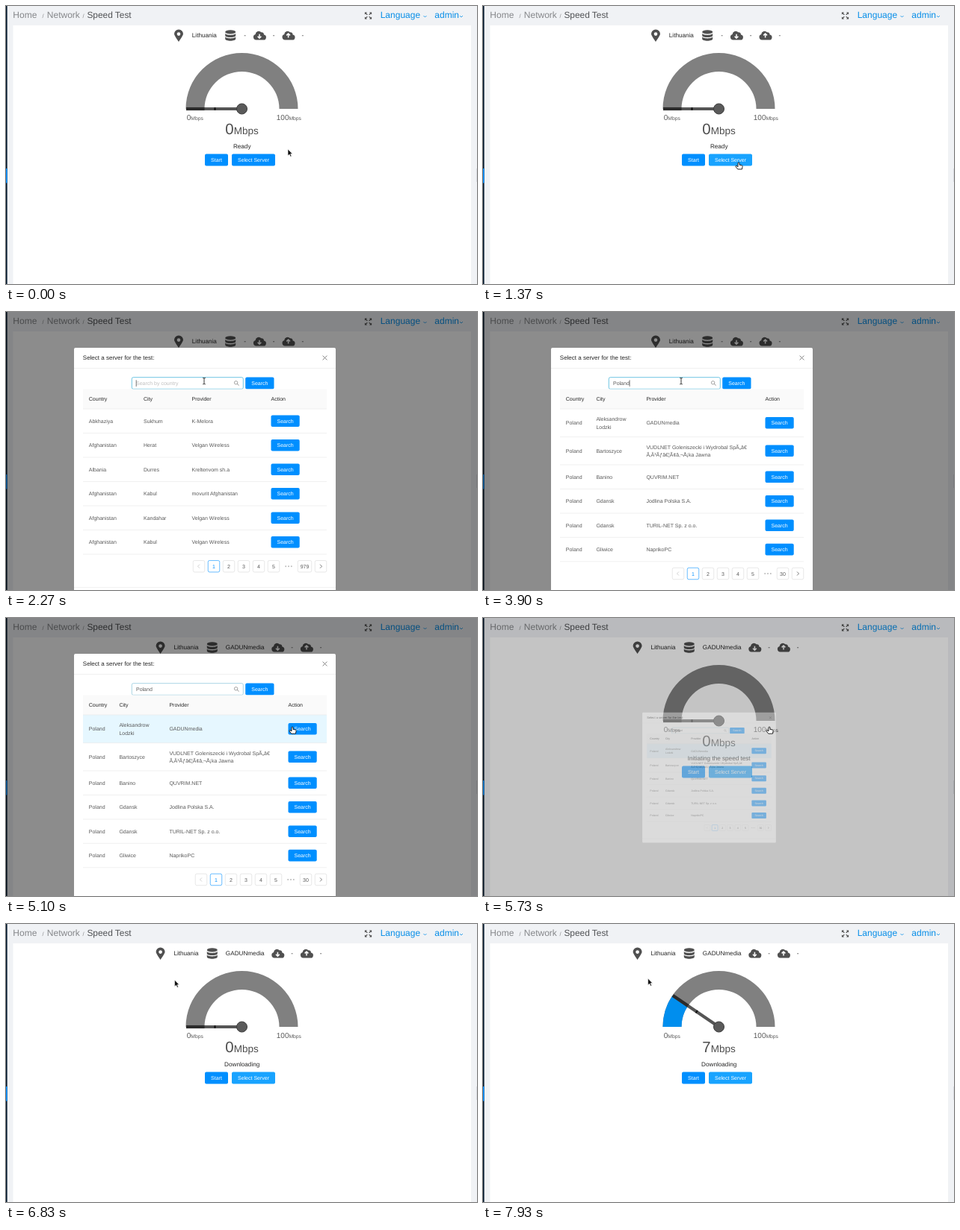
Write an HTML page that moves like this. It is 630x373 px and loops after 8 s.

```html
<!DOCTYPE html>
<html lang="en">
<head>
<meta charset="utf-8">
<title>Speed test</title>
<style>
  html, body { margin: 0; width: 100%; height: 100%; overflow: hidden; background: #f0f2f5; }
  svg { display: block; width: 630px; height: 373px; }
  text { font-family: "Liberation Sans", Arial, sans-serif; text-rendering: geometricPrecision; white-space: pre; }
</style>
</head>
<body>
<svg id="stage" viewBox="0 0 630 373" xmlns="http://www.w3.org/2000/svg"></svg>
<script>
const LOOP = 8000;
const BLUE = '#008fff', LIGHT = '#18a3ff', LINK = '#078ee8';
const GREY = '#595959', DARK = '#262626', ICON = '#505050';
const HUB = { x: 315.5, y: 138 };
const ORIGIN = { x: 340.5, y: 209 };

// Markup helpers
const text = (x, y, s, size = 7, fill = GREY, anchor = 'start', id = '') =>
  `<text x="${x}" y="${y}" font-size="${size}" fill="${fill}" text-anchor="${anchor}"${id && ` id="${id}"`}>${s}</text>`;
const rect = (x, y, w, h, fill, extra = '') =>
  `<rect x="${x}" y="${y}" width="${w}" height="${h}" fill="${fill}" ${extra}/>`;
const line = (d, color, width = 1, extra = '') =>
  `<path d="${d}" fill="none" stroke="${color}" stroke-width="${width}" ${extra}/>`;
const button = (x, y, w, h, label, id = '') =>
  rect(x, y, w, h, BLUE, `rx="2"${id && ` id="${id}"`}`) +
  text(x + w / 2, y + h / 2 + 2.4, label, 7, '#fff', 'middle');
const at = (x, y, inner, extra = '') => `<g transform="translate(${x} ${y})" ${extra}>${inner}</g>`;

// Icons, each drawn around its own centre
const pin = `<path d="M0 8.3C-2.5 4.5-6-.5-6-2.2a6 6 0 0 1 12 0C6-.5 2.5 4.5 0 8.3z" fill="${ICON}"/>
  <circle cy="-2.2" r="2.3" fill="#fff"/>`;
const disc = y => `<path d="M-7 ${y}c0 3.2 14 3.2 14 0v2.9c0 3.6-14 3.6-14 0z" fill="${ICON}"/>`;
const database = `<ellipse cy="-5.3" rx="7" ry="2.7" fill="${ICON}"/>` + disc(-3.7) + disc(0.9);
const cloud = dir => `<path d="M-4.5 6a3.9 3.9 0 0 1-.9-7.6 4.5 4.5 0 0 1 7.8-2.7 3.4 3.4 0 0 1 3.6 3.2A3.6 3.6 0 0 1 4.6 6z" fill="${ICON}"/>` +
  line('M0-2.4V2.6M-2.4 .7L0 3.1 2.4 .7', '#fff', 1.5, `transform="translate(0 .6) scale(1 ${dir})"`);
const corner = `<path d="M4.6-4.6V-1.4L1.4-4.6z" fill="${ICON}"/>` + line('M1.2-1.2L4-4', ICON, 1.2);
const expand = [0, 90, 180, 270].map(a => `<g transform="rotate(${a})">${corner}</g>`).join('');
const chevron = line('M-2-1L0 1 2-1', LINK, 0.8);

// Gauge geometry: angle in degrees, 0 points left, 180 points right
const polar = (r, a) => {
  const k = a * Math.PI / 180;
  return `${(HUB.x - r * Math.cos(k)).toFixed(2)} ${(HUB.y - r * Math.sin(k)).toFixed(2)}`;
};
const sector = a => `M${polar(75, 0)}A75 75 0 0 1 ${polar(75, a)}L${polar(50, a)}A50 50 0 0 0 ${polar(50, 0)}z`;

const needle = `<g id="needle">` +
  line('M0 0H-74.5', '#555', 4.2) + line('M-50 0H-74.5', '#2b2b2b', 4.2) +
  line('M-36-2V2', '#111', 2) + '</g>';

const header =
  rect(0, 0, 630, 373, '#f0f2f5') + rect(9.5, 26, 612.5, 347, '#fff') +
  rect(0, 0, 1.6, 373, '#001529') + rect(0, 218, 1.6, 19.5, BLUE) + rect(629.3, 218, 0.7, 18, '#cfd2d8') +
  text(9.3, 16.3, 'Home', 12, '#85878a') + text(48.6, 16.3, '/', 7.5, '#85878a') +
  text(54.8, 16.3, 'Network', 12, '#85878a') + text(102.6, 16.3, '/', 7.5, '#85878a') +
  text(108.4, 16.3, 'Speed Test', 11.9, '#515356') +
  at(484.5, 13, expand) +
  text(500.7, 16.3, 'Language', 12, LINK) + at(560.5, 14, chevron) +
  text(573.3, 16.3, 'admin', 12, LINK) + at(609, 14, chevron);

const info =
  `<g id="infoLeft">${at(231, 39.8, pin)}${text(248.8, 41.6, 'Lithuania', 8.17, DARK)}${at(300.2, 40.2, database)}</g>` +
  text(319.7, 41.6, '-', 8.17, DARK, 'middle', 'server') +
  `<g id="infoRight">${at(339, 39.5, cloud(1))}${text(358.2, 41.6, '-', 8.17, DARK, 'middle')}` +
  `${at(377.6, 39.5, cloud(-1))}${text(396.8, 41.6, '-', 8.17, DARK, 'middle')}</g>`;

const unit = size => `<tspan font-size="${size}">Mbps</tspan>`;
const gauge =
  `<path d="${sector(180)}" fill="#808080"/><path id="fill" fill="#008eee"/>` + needle +
  `<circle cx="${HUB.x}" cy="${HUB.y}" r="7" fill="#5a5a5a" stroke="#3d3d3d"/>` +
  text(241.8, 153.4, '0' + unit(6.75), 10) + text(361.8, 153.4, '100' + unit(6.75), 10) +
  text(315.5, 172, '<tspan id="speed">0</tspan>' + unit(13.5), 20.4, '#4d4d4d', 'middle') +
  text(315.7, 191.2, 'Ready', 8.17, DARK, 'middle', 'status') +
  button(266, 198.5, 31, 16, 'Start') + button(302, 198.5, 58, 16, 'Select Server', 'select');

// Tables: column positions, row edges and cells ("|" breaks a line)
const HEADS = ['Country', 'City', 'Provider', 'Action'];
const tables = [
  {
    cols: [110.8, 184, 248.5, 354.5], last: '979', lastWidth: 19,
    edges: [130, 162.5, 195, 227.5, 260, 292.4, 325],
    rows: [
      ['Abkhaziya', 'Sukhum', 'K-Melora'],
      ['Afghanistan', 'Herat', 'Velgan Wireless'],
      ['Albania', 'Durres', 'Kreltenvom sh.a'],
      ['Afghanistan', 'Kabul', 'movurit Afghanistan'],
      ['Afghanistan', 'Kandahar', 'Velgan Wireless'],
      ['Afghanistan', 'Kabul', 'Velgan Wireless']
    ]
  },
  {
    cols: [110.8, 151.4, 218.4, 377.5], last: '30', lastWidth: 16,
    edges: [130, 167.6, 205, 237.5, 270, 302.4, 334.8],
    rows: [
      ['Poland', 'Aleksandrow|Lodzki', 'GADUNmedia'],
      ['Poland', 'Bartoszyce', 'VUDLNET Goleniszecki i Wydrobal SpÃ„â€|Ã‚Â³Ãƒâ€¦Ã¢â‚¬Å¡ka Jawna'],
      ['Poland', 'Banino', 'QUVRIM.NET'],
      ['Poland', 'Gdansk', 'Jodlina Polska S.A.'],
      ['Poland', 'Gdansk', 'TURIL-NET Sp. z o.o.'],
      ['Poland', 'Gliwice', 'NaprikoPC']
    ]
  }
];

function cell(x, mid, s) {
  const parts = s.split('|');
  return parts.map((p, i) => text(x, mid + 2.5 + (i - (parts.length - 1) / 2) * 10.5, p)).join('');
}

function pager(y, last, lastWidth) {
  const box = (x, w, label, color = GREY, edge = '#d9d9d9') =>
    rect(x + 0.25, y - 7.75, w - 0.5, 15.5, '#fff', `rx="2" stroke="${edge}" stroke-width=".6"`) +
    text(x + w / 2, y + 2.5, label, 7, color, 'middle');
  const dots = 409 - lastWidth - 20;
  let s = box(413, 16, '') + line(`M420 ${y - 2.5}l2.5 2.5-2.5 2.5`, GREY, 0.8) + box(409 - lastWidth, lastWidth, last);
  for (let i = 0; i < 3; i++) s += `<circle cx="${dots + 4.2 + i * 3.8}" cy="${y}" r="1" fill="#bbb"/>`;
  for (let n = 1; n <= 5; n++)
    s += box(dots - (6 - n) * 20, 16, n, n === 1 ? BLUE : GREY, n === 1 ? BLUE : '#d9d9d9');
  return s + box(dots - 120, 16, '') + line(`M${dots - 111} ${y - 2.5}l-2.5 2.5 2.5 2.5`, '#c4c4c4', 0.8);
}

function tableMarkup({ cols, edges, rows, last, lastWidth }, i) {
  let s = rect(103, 103.5, 326, 26.5, '#fafafa');
  HEADS.forEach((h, c) => s += text(cols[c], 119, h, 7, DARK));
  edges.forEach(y => s += line(`M103 ${y}H429`, '#e6e6e6', 0.6));
  rows.forEach((row, r) => {
    const mid = (edges[r] + edges[r + 1]) / 2;
    row.forEach((s2, c) => s += cell(cols[c], mid, s2));
    s += button(cols[3], mid - 7.8, 38.2, 15.6, 'Search');
  });
  const end = edges[6];
  s += pager(end + 16.2, last, lastWidth) + line(`M91 ${end + 44.6}H441`, '#e6e6e6', 0.6);
  return `<g id="table${i}">${s}</g>`;
}

const modal = '<g id="modal">' +
  rect(91, 48, 350, 332, '#fff', 'rx="2" id="sheet"') +
  text(102.8, 64, 'Select a server for the test:', 8, DARK) +
  line('M423.6 58.6l5.8 5.8M429.4 58.6l-5.8 5.8', '#777', 0.9) +
  line('M91 75.5H441', '#e6e6e6', 0.6) +
  rect(168.3, 87.7, 149, 15.6, '#fff', 'rx="2" id="input" stroke-width=".8"') +
  text(174, 98, '', 7, GREY, 'start', 'query') + line('M0 91.3V100', '#222', 0.6, 'id="caret"') +
  '<circle cx="307.6" cy="94.8" r="2.2" fill="none" stroke="#8c8c8c" stroke-width=".8"/>' +
  line('M309.2 96.4l2.3 2.3', '#8c8c8c', 1) +
  button(320.2, 87.5, 38.3, 16, 'Search') +
  rect(103, 0, 326, 0, '#e6f7ff', 'id="hover"') +
  tables.map(tableMarkup).join('') + '</g>';

const cursors =
  '<path id="arrow" d="M0 0V9L2.1 7.1 3.5 10.2 5 9.5 3.6 6.5H6.2z" fill="#111" stroke="#fff" stroke-width=".6"/>' +
  '<path id="hand" d="M-1 .9a1 1 0 0 1 2 0V3.2L4.3 3.8Q5.3 4.2 5.1 5.4L4.4 9H-1.2L-4 5.6Q-4.2 4.2-3 4.4L-1 5.7z" fill="#fff" stroke="#111" stroke-width=".9"/>' +
  `<g id="beam">${line('M-1.8-4.3Q0-4.3 0-3.4Q0-4.3 1.8-4.3M0-3.6V3.6M-1.8 4.3Q0 4.3 0 3.4Q0 4.3 1.8 4.3', '#222', 0.9)}</g>`;

const stage = document.getElementById('stage');
stage.innerHTML = header + info + gauge + rect(0, 0, 630, 373, '#000', 'id="mask"') + modal +
  `<g id="cursor">${cursors}</g>`;

const $ = {};
stage.querySelectorAll('[id]').forEach(n => $[n.id] = n);
const set = (id, attrs) => { for (const k in attrs) $[id].setAttribute(k, attrs[k]); };
const show = (id, on) => set(id, { display: on ? 'inline' : 'none' });
const write = (id, s) => { if ($[id].textContent !== s) $[id].textContent = s; };

// Timing helpers
const span = (t, from, to) => Math.min(1, Math.max(0, (t - from) / (to - from)));
const inOut = (u, n = 2) => u < 0.5 ? (2 * u) ** n / 2 : 1 - (2 - 2 * u) ** n / 2;
const latest = (t, list) => list.reduce((v, [from, value]) => t >= from ? value : v, undefined);

// Pointer moves: from, to, x, y
const moves = [
  [100, 330, 370, 221], [470, 730, 347, 214.5], [1100, 1300, 342, 210],
  [1930, 2250, 265, 92.6], [4330, 4800, 383, 146.2],
  [6130, 6450, 345, 197], [6450, 6900, 219.6, 69], [7670, 7900, 220.6, 73]
];
const pointer = t => moves.reduce((p, [from, to, x, y]) => {
  const u = inOut(span(t, from, to));
  return { x: p.x + (x - p.x) * u, y: p.y + (y - p.y) * u };
}, { x: 377, y: 192 });

const typed = [[0, ''], [3100, 'P'], [3300, 'Po'], [3400, 'Pol'], [3500, 'Pola'], [3600, 'Polan'], [3700, 'Poland']];
const speeds = [[0, '0'], [6900, '5'], [7330, '6'], [7670, '7']];
const angles = [[0, 0], [6965, 19], [7025, 32.6], [7330, 0], [7500, 34], [7670, 0], [7735, 14], [7800, 27], [7925, 34.3]];
const shapes = [[0, 'arrow'], [1200, 'hand'], [1500, 'arrow'], [2200, 'beam'], [4370, 'arrow'], [4740, 'hand'], [6160, 'arrow']];

function dialog(t) {
  if (t < 5665) return {
    zoom: 1 - (1 - span(t, 1500, 1750)) ** 3.25,
    dim: span(t, 1486, 1686)
  };
  const s = 5665 + Math.floor((t - 5665) / 65) * 65;
  return { zoom: 1 - inOut(span(s, 5630, 5815), 3), dim: 1 - span(s, 5640, 5825) };
}

function draw(t) {
  const p = pointer(t);
  const { zoom, dim } = dialog(t);

  // Page
  const chosen = t >= 5000;
  write('server', chosen ? 'GADUNmedia' : '-');
  set('infoLeft', { transform: `translate(${chosen ? -24.4 : 0} 0)` });
  set('infoRight', { transform: `translate(${chosen ? 24.4 : 0} 0)` });
  write('status', t < 5000 ? 'Ready' : t < 6800 ? 'Initiating the speed test' : 'Downloading');
  write('speed', latest(t, speeds));
  set('select', { fill: t >= 1200 ? LIGHT : BLUE });
  const angle = latest(t, angles);
  set('fill', { d: angle ? sector(angle) : '' });
  set('needle', { transform: `translate(${HUB.x} ${HUB.y}) rotate(${angle})` });

  // Dialog
  set('mask', { opacity: 0.45 * dim });
  show('modal', zoom > 0);
  const k = 0.2 + 0.8 * zoom;
  set('modal', {
    opacity: zoom,
    transform: `translate(${ORIGIN.x * (1 - k)} ${ORIGIN.y * (1 - k)}) scale(${k})`
  });
  const found = t >= 3900;
  const { edges } = tables[+found];
  show('table0', !found);
  show('table1', found);
  set('sheet', { height: edges[6] + 55.5 - 48 });
  const row = edges.findIndex((y, i) => i < 6 && p.y >= y && p.y < edges[i + 1]);
  show('hover', row >= 0);
  if (row >= 0) set('hover', { y: edges[row], height: edges[row + 1] - edges[row] });

  // Search field
  const focused = t >= 2250 && t < 4950;
  const query = latest(t, typed);
  set('input', { stroke: focused ? '#49b6dc' : t >= 4950 ? '#93c9de' : '#d9d9d9' });
  write('query', query || 'Search by country');
  set('query', { fill: query ? GREY : '#bfbfbf' });
  show('caret', focused && (t < 2830 || t >= 3100));
  const caretX = query ? 174.3 + $.query.getComputedTextLength() : 174.2;
  set('caret', { transform: `translate(${caretX} 0)` });

  // Pointer
  const shape = latest(t, shapes);
  ['arrow', 'hand', 'beam'].forEach(s => show(s, s === shape));
  set('cursor', { transform: `translate(${p.x} ${p.y})` });
}

const start = performance.now();
function tick() {
  draw((performance.now() - start) % LOOP);
  requestAnimationFrame(tick);
}
tick();
</script>
</body>
</html>
```
